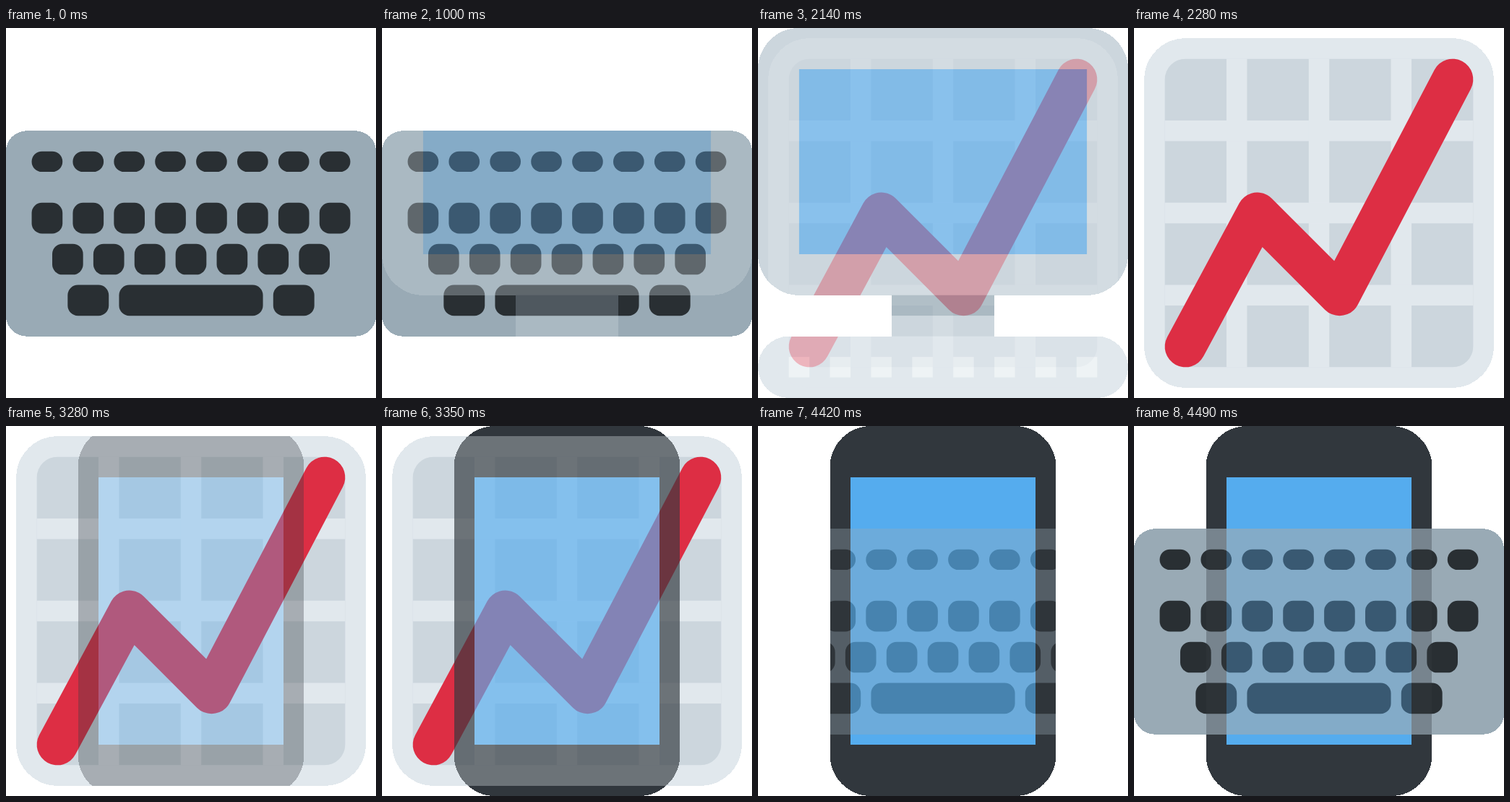
An HTML page with a canvas that plays this animation: 512x512 px, repeating every 4.56 s.

```html
<!DOCTYPE html>
<html lang="en">
<head>
<meta charset="utf-8">
<title>Device icons</title>
<style>
  html, body { margin: 0; width: 100%; height: 100%; overflow: hidden; background: #fff; }
  canvas { display: block; width: 100vw; height: 100vh; }
</style>
</head>
<body>
<canvas id="stage" width="512" height="512"></canvas>
<script>
const SIZE = 512;
const UNIT = SIZE / 36; // icons are laid out on a 36 x 36 grid
const HOLD = 1000, STEP = 70;
const SLOT = HOLD + 2 * STEP;

const ctx = document.getElementById('stage').getContext('2d');

function box(c, color, x, y, w, h, r = 0) {
  c.fillStyle = color;
  c.beginPath();
  c.roundRect(x, y, w, h, r);
  c.fill();
}

function row(c, color, count, x, y, w, h, r) {
  for (let i = 0; i < count; i++) box(c, color, x + 4 * i, y, w, h, r);
}

function keyboard(c) {
  const key = '#292f33';
  box(c, '#99aab5', 0, 10, 36, 20, 2);
  row(c, key, 8, 2.5, 12, 3, 2, 1);
  row(c, key, 8, 2.5, 17, 3, 3, 1);
  row(c, key, 7, 4.5, 21, 3, 3, 1);
  box(c, key, 6, 25, 4, 3, 1);
  box(c, key, 11, 25, 14, 3, 1);
  box(c, key, 26, 25, 4, 3, 1);
}

function computer(c) {
  box(c, '#ccd6dd', 0, 0, 36, 26, 4);
  box(c, '#5dadec', 4, 4, 28, 18);
  box(c, '#99aab5', 13, 26, 10, 2);
  box(c, '#ccd6dd', 13, 28, 10, 2);
  box(c, '#e1e8ed', 0, 30, 36, 6, 3);
  row(c, '#f5f8fa', 8, 3, 32, 2, 2);
}

function chart(c) {
  const frame = '#e1e8ed';
  box(c, frame, 1, 1, 34, 34, 4);
  box(c, '#ccd6dd', 3, 3, 30, 30, 2);
  for (const p of [9, 17, 25]) {
    box(c, frame, p, 3, 2, 30);
    box(c, frame, 3, p, 30, 2);
  }
  c.strokeStyle = '#dd2e44';
  c.lineWidth = 4;
  c.lineCap = c.lineJoin = 'round';
  c.beginPath();
  c.moveTo(5, 31);
  c.lineTo(12, 18);
  c.lineTo(20, 26);
  c.lineTo(31, 5);
  c.stroke();
}

function phone(c) {
  box(c, '#31373d', 7, 0, 22, 36, 4);
  box(c, '#55acee', 9, 5, 18, 26);
}

function layer() {
  const el = document.createElement('canvas');
  el.width = el.height = SIZE;
  return el;
}

// Render an icon once, with a hard silhouette edge.
function render(paint) {
  const el = layer();
  const c = el.getContext('2d');
  c.scale(UNIT, UNIT);
  paint(c);
  const img = c.getImageData(0, 0, SIZE, SIZE);
  for (let i = 3; i < img.data.length; i += 4) {
    img.data[i] = img.data[i] < 128 ? 0 : 255;
  }
  c.putImageData(img, 0, 0);
  return el;
}

// Tint one icon with another, inside the first one's silhouette.
function blend(base, tint) {
  const el = layer();
  const c = el.getContext('2d');
  c.drawImage(base, 0, 0);
  c.globalCompositeOperation = 'source-atop';
  c.globalAlpha = 1 / 3;
  c.drawImage(tint, 0, 0);
  return el;
}

const icons = [keyboard, computer, chart, phone].map(render);
const fades = icons.map((icon, i) => {
  const next = icons[(i + 1) % icons.length];
  return [blend(icon, next), blend(next, icon)];
});

const start = performance.now();

function draw() {
  const t = Math.max(0, performance.now() - start) % (SLOT * icons.length);
  const i = Math.floor(t / SLOT);
  const local = t - i * SLOT;

  ctx.fillStyle = '#fff';
  ctx.fillRect(0, 0, SIZE, SIZE);
  if (local < HOLD) {
    ctx.drawImage(icons[i], 0, 0);
  } else {
    // The first fade stays visible beneath the second.
    ctx.drawImage(fades[i][0], 0, 0);
    if (local >= HOLD + STEP) ctx.drawImage(fades[i][1], 0, 0);
  }
  requestAnimationFrame(draw);
}
draw();
</script>
</body>
</html>
```
